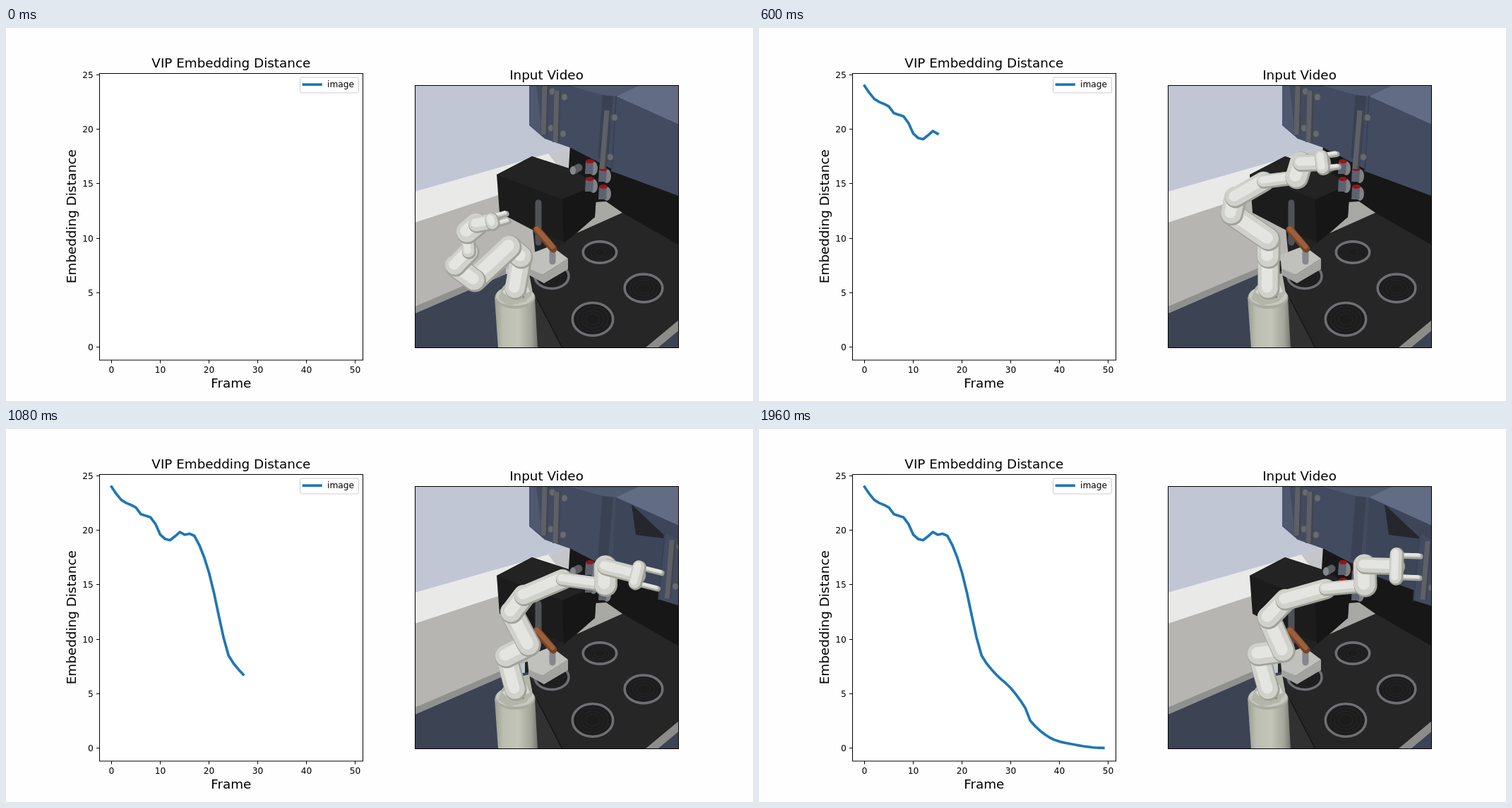
Write an HTML page that moves like this. It is 1058 px wide and 529 px high and loops after 3.2 s.

```html
<!DOCTYPE html>
<html lang="en">
<head>
<meta charset="utf-8">
<title>VIP Embedding Distance</title>
<style>
html, body { margin: 0; width: 100%; height: 100%; overflow: hidden; background: #fefefe; }
svg { display: block; width: 100vw; height: 100vh; }
text { font-family: "DejaVu Sans", sans-serif; font-size: 12.23px; fill: #000; }
.big { font-size: 18.35px; }
.mid { text-anchor: middle; }
.end { text-anchor: end; }
</style>
</head>
<body>
<svg viewBox="0 0 1058 529">
  <defs>
    <clipPath id="view"><rect x="579.5" y="81.5" width="373" height="372"/></clipPath>
    <linearGradient id="column">
      <stop offset="0" stop-color="#999b90"/><stop offset=".2" stop-color="#bcbeb1"/>
      <stop offset=".55" stop-color="#c3c5b8"/><stop offset=".85" stop-color="#a2a498"/>
      <stop offset="1" stop-color="#74766f"/>
    </linearGradient>
  </defs>
  <g id="chart"></g>
  <polyline id="curve" fill="none" stroke="#1f77b4" stroke-width="3.7" stroke-linejoin="round" stroke-linecap="square"/>
  <g clip-path="url(#view)">
    <g id="room"></g>
    <g id="door"></g>
    <g id="arm"></g>
  </g>
  <rect x="579.5" y="81.5" width="373" height="372" fill="none" stroke="#000"/>
  <text class="big mid" x="765.5" y="73">Input Video</text>
</svg>
<script>
const NS = "http://www.w3.org/2000/svg";
const byId = id => document.getElementById(id);

function set(el, attrs) {
  for (const k in attrs) el.setAttribute(k, attrs[k]);
  return el;
}
function add(parent, tag, attrs, text) {
  const el = set(document.createElementNS(NS, tag), attrs);
  if (text !== undefined) el.textContent = text;
  parent.appendChild(el);
  return el;
}
const poly = (g, fill, points) => add(g, "polygon", { points, fill });
const bar = (g, stroke, width, x1, y1, x2, y2, cap = "round") =>
  add(g, "line", { x1, y1, x2, y2, stroke, "stroke-width": width, "stroke-linecap": cap });
const oval = (g, fill, cx, cy, rx, ry, more) => add(g, "ellipse", { cx, cy, rx, ry, fill, ...more });

// Smooth curve through rows of [step, ...values]
function blend(rows, n) {
  const last = rows.length - 1;
  if (n >= rows[last][0]) return rows[last].slice(1);
  const k = rows.findIndex((r, i) => n < rows[i + 1][0]);
  const from = rows[k], to = rows[k + 1], h = to[0] - from[0], u = (n - from[0]) / h;
  const slope = (i, c) => {
    if (i === last) return 0;
    const a = rows[Math.max(0, i - 1)], b = rows[i + 1];
    return (b[c] - a[c]) / (b[0] - a[0]);
  };
  const s = u * u * (3 - 2 * u);
  return from.slice(1).map((p, i) => p + (to[i + 1] - p) * s +
    h * u * (1 - u) * ((1 - u) * slope(k, i + 1) - u * slope(k + 1, i + 1)));
}

// Chart
const DISTANCE = [[0, 24], [2, 22.8], [5, 22.1], [6, 21.5], [8, 21.2], [9, 20.6], [10, 19.6],
  [12, 19.1], [14, 19.85], [15, 19.6], [17, 19.5], [20, 16.1], [23, 10.1], [24, 8.5],
  [27, 6.75], [30, 5.5], [33, 3.65], [34, 2.5], [38, 0.95], [42, 0.4], [49, 0]];
const chartX = i => 149.5 + 6.905 * i;
const chartY = v => 452.4 - 15.43 * v;

function drawChart() {
  const g = byId("chart");
  const title = (x, y, text, turn = 0) =>
    add(g, "text", { class: "big mid", transform: `translate(${x} ${y}) rotate(${turn})` }, text);
  add(g, "rect", { x: 132.5, y: 64.5, width: 373, height: 406.5, fill: "#fff", stroke: "#000" });
  for (let v = 0; v <= 50; v += 10) {
    const x = Math.floor(chartX(v)) + 0.5;
    bar(g, "#000", 1, x, 471, x, 475.5, "butt");
    add(g, "text", { class: "mid", x, y: 489 }, v);
  }
  for (let v = 0; v <= 25; v += 5) {
    const y = Math.floor(chartY(v)) + 0.5;
    bar(g, "#000", 1, 128, y, 132, y, "butt");
    add(g, "text", { class: "end", x: 123.8, y: Math.round(y + 4.2) }, v);
  }
  title(318.8, 56, "VIP Embedding Distance");
  title(318.8, 510, "Frame");
  title(99, 267.2, "Embedding Distance", -90);
  add(g, "rect", { x: 416.5, y: 70, width: 83, height: 22, rx: 2.5, fill: "#fff", stroke: "#ccc" });
  bar(g, "#1f77b4", 3.7, 421.5, 80.2, 446, 80.2, "square");
  add(g, "text", { x: 455, y: 84 }, "image");
}

// Kitchen
function knob(g, x, y) {
  oval(g, "#808286", x + 5, y + 10, 6, 10);
  poly(g, "#5c6270", `${x - 6},${y} ${x + 5},${y} ${x + 4},${y + 18} ${x - 7},${y + 18}`);
  oval(g, "#9a1417", x, y, 6, 3);
}
function burner(g, x, y, r, flat) {
  oval(g, "#1c1c1c", x, y, r, r * flat, { stroke: "#6d6f73", "stroke-width": 3.6 });
  for (const k of [0.75, 0.55, 0.35])
    oval(g, "none", x, y, r * k, r * k * flat, { stroke: "#232324", "stroke-width": 1.5 });
}
function handle(g, x1, y1, x2, y2) {
  bar(g, "#41454c", 10, x1, y1, x2, y2, "butt");
  bar(g, "#5d6167", 7, x1 - 1, y1, x2 - 1, y2, "butt");
}
function peg(g, x, y) {
  bar(g, "#4b4f56", 9, x, y, x + 9, y + 1);
  oval(g, "#666a71", x + 9, y + 1, 4, 4.5);
}

function drawRoom() {
  const g = byId("room");
  poly(g, "#c1c6d5", "579,81 953,81 953,454 579,454");
  poly(g, "#e9e9e8", "579,232 765,179 800,168 800,210 697,240 579,277");
  poly(g, "#c4c6ca", "768,178 800,168 800,201 780,194");
  poly(g, "#222223", "735,230 953,230 953,454 735,454");
  poly(g, "#b6b5b1", "579,276 697,237 746,285 750,325 706,343 579,396");
  poly(g, "#8f918f", "579,395 708,340 708,349 579,405");
  poly(g, "#3c4353", "579,405 708,349 740,345 760,454 579,454");
  // stove
  poly(g, "#171717", "799,166 953,230 953,330 790,310");
  poly(g, "#262627", "742,345 810,289 873,262 953,308 953,416 906,454 786,454 750,385");
  poly(g, "#313132", "746,380 752,384 788,454 750,454");
  bar(g, "#151515", 1.5, 752, 384, 788, 454);
  poly(g, "#8c8d89", "905,454 953,414 953,429 923,454");
  poly(g, "#3c4353", "923,454 953,429 953,454");
  poly(g, "#a8a8a4", "834,247 850,246 873,262 808,291 834,268");
  burner(g, 773, 352, 24, 0.73);
  burner(g, 841, 318, 23.7, 0.64);
  burner(g, 903, 369, 26.8, 0.74);
  burner(g, 831, 413, 28.7, 0.81);
  // dark box
  poly(g, "#1c1c1c", "745,182 800,200 837,222 834,268 790,303 745,286 699,262 695,208");
  poly(g, "#232323", "745,182 800,200 837,222 788,243 695,208");
  poly(g, "#161616", "788,243 837,222 834,268 790,303");
  bar(g, "#595c60", 11, 804, 202, 811, 198);
  oval(g, "#85888d", 803, 202, 4, 6);
  for (const y of [189, 214]) {
    knob(g, 827, y);
    knob(g, 846, y + 11);
  }
  // small appliance
  poly(g, "#a3a4a1", "740,340 760,350 796,327 796,342 762,362 740,350");
  poly(g, "#c0c1bd", "738,322 772,309 796,327 760,350 740,341");
  bar(g, "#4f5358", 9, 754, 248, 754, 304);
  bar(g, "#85878a", 9, 774, 318, 774, 331);
  bar(g, "#784426", 11, 752, 286, 775, 313);
  bar(g, "#9c5f3c", 7, 752, 285, 774, 310);
  // wall cupboards
  poly(g, "#434b60", "741,81 953,81 953,238 862,202 800,170 763,157 741,138");
  poly(g, "#4f586f", "741,81 751,81 760,152 741,138");
  poly(g, "#4f5970", "795,81 900,81 864,97 845,95");
  poly(g, "#394153", "845,95 860,97 852,192 838,184");
  poly(g, "#636c85", "864,97 898,81 953,81 953,137");
  poly(g, "#3d4559", "864,97 953,137 953,238 858,203");
  poly(g, "#25272d", "886,107 938,156 892,150");
  for (const [x, y, len] of [[763, 81, 70], [780, 89, 73]]) {
    peg(g, x + 2, y + 8);
    peg(g, x, y + 60);
    handle(g, x + 1, y, x - 1, y + len);
  }
}

const door = {};
function buildDoor() {
  const g = byId("door");
  door.panel = poly(g, "#434b60", "");
  door.edge = bar(g, "#394154", 2, 0, 0, 0, 0);
  door.grip = add(g, "g", {});
  peg(door.grip, 853, 126);
  peg(door.grip, 847, 182);
  handle(door.grip, 852, 117, 845, 200);
}
function poseDoor(o) {
  const x1 = 864 + 72 * o, y1 = 97 + 52 * o, x2 = 858 + 69 * o, y2 = 203 + 40 * o;
  set(door.panel, { points: `${x1},${y1} 953,${137 + 20 * o} 953,${238 + 13 * o} ${x2},${y2}` });
  set(door.edge, { x1, y1, x2, y2 });
  set(door.grip, { transform: `translate(${96 * o} ${42 * o})` });
}

// Robot key poses: step, hand angle, hand half-width, then joints from shoulder to hand
const POSES = [
  [0, -16, 8, 730,325, 714,311, 664,358, 637,338, 656,318, 654,290, 667,279, 689,275],
  [7, 4, 16, 728,325, 716,309, 650,317, 638,290, 688,270, 714,264, 717,246, 745,245],
  [15, -8, 13, 722,325, 722,300, 670,264, 675,241, 715,218, 762,212, 768,192, 798,191],
  [23, 16, 14, 711,324, 738,303, 709,258, 723,235, 775,209, 836,220, 837,196, 880,210],
  [37, 2, 22, 708,320, 743,315, 722,268, 746,243, 803,227, 859,222, 858,194, 903,195]
];
const WIDTHS = [31, 33, 33, 32, 29, 20, 33, 24];
const links = [];
const hand = {};

function tube(g, width) {
  return [["#a0a29a", 0], ["#cfd1ca", 3], ["#e4e5e0", 0.5 * width]].map(([color, less]) =>
    bar(g, color, width - less, 0, 0, 0, 0));
}
function place(layers, x1, y1, x2, y2) {
  layers.forEach((el, i) => {
    const d = i * 1.2;
    set(el, { x1: x1 - d, y1: y1 - d, x2: x2 - d, y2: y2 - d });
  });
}
function buildArm() {
  const g = byId("arm");
  poly(g, "url(#column)", "692,382 749,382 753,454 697,454");
  oval(g, "#a9aba0", 721, 382, 28.5, 16);
  oval(g, "#c6c8be", 721, 380, 27, 14);
  poly(g, "#b4b6ac", "697,384 703,368 716,354 741,348 746,376 736,388 712,394");
  poly(g, "#d6d8d1", "703,374 717,360 737,363 742,374 715,384");
  for (const x of [724, 732]) oval(g, "#75776f", x, 383 - (x - 724) / 4, 2, 2);
  WIDTHS.forEach(w => links.push(tube(g, w)));
  hand.fingers = [tube(g, 8), tube(g, 8)];
  hand.palm = tube(g, 20);
}
function poseArm(n) {
  const t = Math.max(0, Math.min(1, (n - 15) / 15));
  const open = 1 - (1 - t) ** 2;
  poseDoor(open);

  const [angle, half, ...joints] = blend(POSES, n);
  const p = [722, 370, ...joints];
  links.forEach((l, i) => place(l, ...p.slice(2 * i, 2 * i + 4)));

  const a = angle * Math.PI / 180, c = Math.cos(a), s = Math.sin(a);
  const [x, y] = p.slice(-2);
  const at = (f, r) => [x + f * c - r * s, y + f * s + r * c];
  const palm = Math.max(3, half - 5);
  place(hand.palm, ...at(0, -palm), ...at(0, palm));
  hand.fingers.forEach((f, i) => {
    const side = (i - 0.5) * 1.4 * half;
    place(f, ...at(6, side), ...at(22 + 11 * open, side));
  });
}

let shown = -1;
function render(ms) {
  const n = Math.min(49, Math.floor((ms % 3200) / 40));
  if (n === shown) return;
  shown = n;
  const points = [];
  for (let i = 0; n && i <= n; i++) points.push(`${chartX(i)},${chartY(blend(DISTANCE, i)[0])}`);
  set(byId("curve"), { points: points.join(" ") });
  poseArm(n);
}

drawChart();
drawRoom();
buildDoor();
buildArm();
let start;
function tick(now) {
  if (start === undefined) start = now;
  render(Math.max(0, now - start));
  requestAnimationFrame(tick);
}
render(0);
requestAnimationFrame(tick);
</script>
</body>
</html>
```
